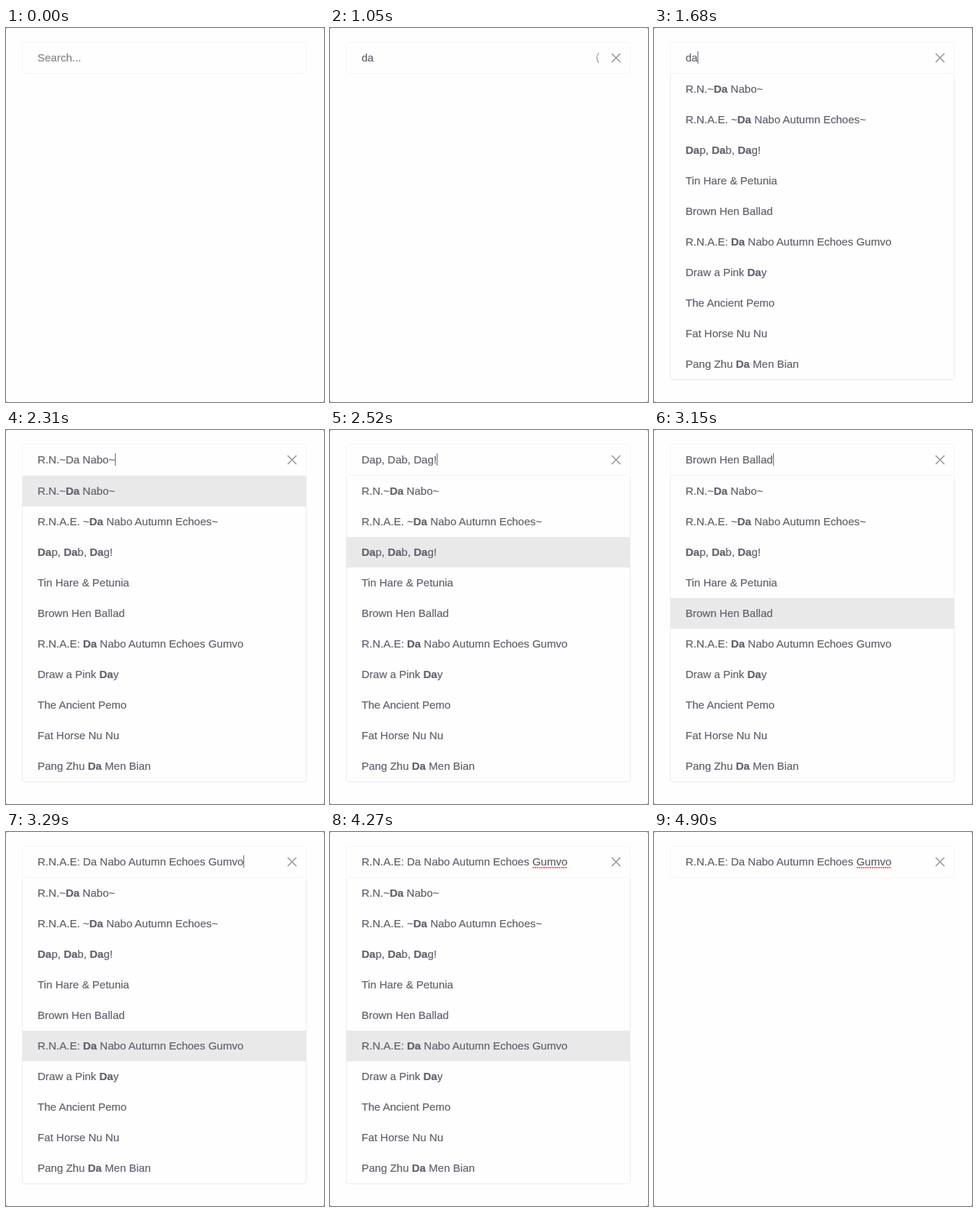
Recreate the animation shown at these times as an HTML page. Size 438 px wide and 514 px high, loop 5.25 s.

```html
<!DOCTYPE html>
<html lang="en">
<head>
<meta charset="utf-8">
<title>Search suggestions</title>
<style>
  html, body { margin: 0; width: 100%; height: 100%; overflow: hidden; background: #777; }
  .stage {
    position: relative; width: 438px; height: 514px; overflow: hidden;
    background: #fefefe; border-radius: 2px;
    font: 15px/42px "Liberation Sans", Arial, sans-serif; color: #62626c;
    -webkit-text-stroke: 0.2px;
  }
  .stage * { box-sizing: border-box; }
  .field {
    position: absolute; left: 22px; top: 19px; width: 392px; height: 44px;
    padding-left: 20.5px; border: 1px solid #f4f4f4; border-radius: 6px; white-space: pre;
  }
  .placeholder { color: #858585; }
  .caret {
    display: inline-block; width: 1px; height: 17px; margin-right: -1px;
    vertical-align: -3px; background: #666;
  }
  .typo { position: relative; }
  .marked .typo::after {
    content: ""; position: absolute; left: 0; right: 0; bottom: -1px; height: 2px;
    background: repeating-linear-gradient(90deg, #d98080 0 2px, #f6dcdc 2px 3px);
  }
  .clear { position: absolute; left: 387px; top: 34px; }
  .spinner {
    position: absolute; left: 367px; top: 31px; width: 20px; height: 20px;
    border: 1px solid transparent; border-left-color: #858585; border-radius: 50%;
  }
  .list {
    position: absolute; left: 22px; top: 63px; width: 392px; height: 421px;
    margin: 0; padding: 0; list-style: none; overflow: hidden;
    border: 1px solid #ebebeb; border-top: 0; border-radius: 0 0 4px 4px;
  }
  .list li { height: 42px; padding-left: 20.5px; white-space: pre; }
  .list .active { background: #e9e9e9; }
  [hidden] { display: none !important; }
</style>
</head>
<body>
<div class="stage">
  <div class="field"><span class="placeholder">Search...</span><span class="value"></span><span class="caret"></span></div>
  <div class="spinner"></div>
  <svg class="clear" width="14" height="14" viewBox="0 0 14 14">
    <path d="M1 1L13 13M13 1L1 13" stroke="#999" stroke-width="1.6" fill="none"/>
  </svg>
  <ul class="list"></ul>
</div>
<script>
  const LOOP = 5250, TICK = 70, SPIN = 600;
  const titles = [
    'R.N.~Da Nabo~',
    'R.N.A.E. ~Da Nabo Autumn Echoes~',
    'Dap, Dab, Dag!',
    'Tin Hare & Petunia',
    'Brown Hen Ballad',
    'R.N.A.E: Da Nabo Autumn Echoes Gumvo',
    'Draw a Pink Day',
    'The Ancient Pemo',
    'Fat Horse Nu Nu',
    'Pang Zhu Da Men Bian'
  ];
  // [start time, field text, selected row]
  const steps = [
    [0, '', -1], [420, 'd', -1], [560, 'da', -1],
    ...[2100, 2380, 2520, 2870, 3150, 3290].map((at, i) => [at, titles[i], i])
  ];

  const find = s => document.querySelector(s);
  const stage = find('.stage'), value = find('.value'), caret = find('.caret');
  const list = find('.list'), spinner = find('.spinner');
  const escape = s => s.replace(/&/g, '&amp;');
  const within = (t, a, b) => t >= a && t < b;

  list.innerHTML = titles
    .map(s => `<li>${escape(s).replace(/da/gi, '<b>$&</b>')}</li>`).join('');

  let shown = null;
  function setStep(step) {
    if (step === shown) return;
    shown = step;
    value.innerHTML = escape(step[1]).replace('Gumvo', '<span class="typo">$&</span>');
    [...list.children].forEach((li, i) => li.classList.toggle('active', i === step[2]));
  }

  function render(time) {
    const t = Math.floor(time % LOOP / TICK) * TICK;
    setStep(steps.filter(s => s[0] <= t).pop());
    find('.placeholder').hidden = t >= 420;
    caret.hidden = !(within(t, 420, 1050) || within(t, 1540, 3850) || within(t, 4410, 4900));
    find('.clear').style.display = t >= 490 ? 'block' : 'none';
    spinner.hidden = !within(t, 1050, 1610);
    spinner.style.transform = `rotate(${(t - 1050) / SPIN * 360}deg)`;
    list.hidden = !within(t, 1610, 4620);
    stage.classList.toggle('marked', t >= 3710);
  }

  const start = performance.now();
  function frame() {
    render(performance.now() - start);
    requestAnimationFrame(frame);
  }
  frame();
</script>
</body>
</html>
```
